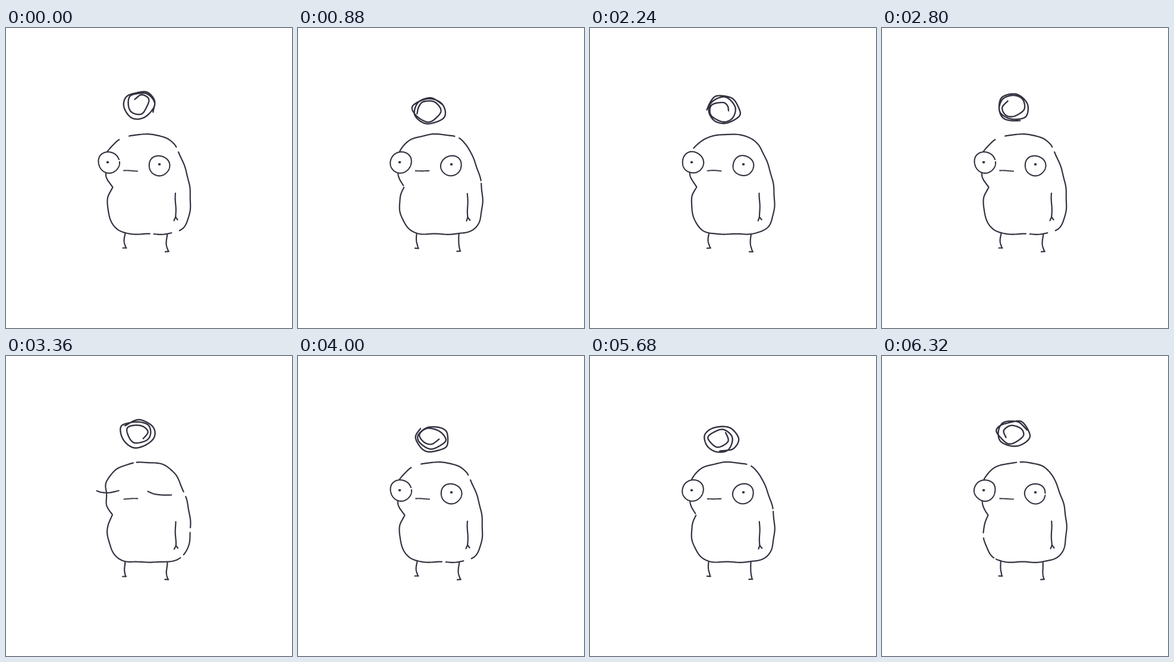
Animation of 481 by 504 pixels, one loop 6400 ms. Source, as an HTML page with a canvas:

```html
<!DOCTYPE html>
<html lang="en">
<head>
<meta charset="utf-8">
<title>Tangled thoughts</title>
<style>
html, body { margin: 0; width: 100%; height: 100%; overflow: hidden; background: #fff; }
canvas { display: block; width: 481px; height: 504px; }
</style>
</head>
<body>
<canvas id="stage" width="481" height="504"></canvas>
<script>
const ctx = document.getElementById('stage').getContext('2d');
const INK = '#343240', PAPER = '#fff';
const STEP = 80, FRAMES = 80, TANGLE_CYCLE = 40, BOB_CYCLE = 20;
const TAU = Math.PI * 2;

// Key points clockwise from the dent in the left side.
const OUTLINE = [
  [179, 267], [169, 250], [169, 230], [169, 211], [185, 191], [204, 182.5], [230, 178.5],
  [263, 182], [281, 194], [292, 212], [305, 247], [310, 280], [309, 308], [303, 329],
  [290, 341], [267, 346], [237, 346], [202, 345], [183, 334], [172, 309], [171.5, 285], [179, 267]
];

// Where the pen lifts in each redrawn pose: [direction from the middle, half width] in degrees.
const POSE_GAPS = [
  [[-118, 5], [-50, 3], [61, 4], [86, 1.5]],
  [[-71, 2], [-3, 1.2], [176, 1]],
  [[-106, 1.3], [-27, 2.5], [24, 2], [53, 2]],
  [[-140, 2]],
  [[-97, 1.3], [122, 1], [151, 2.5]]
];

let pose = 0;

// A gentle distortion that differs per pose, so every line boils a little.
const warp = ([x, y]) => [
  x + 0.5 * Math.sin(y * 0.17 + pose * 2.4),
  y + 0.5 * Math.sin(x * 0.15 + pose * 1.7)
];

function seeded(seed) {
  let s = seed * 7919 + 17;
  return () => {
    s = (s + 0x6D2B79F5) | 0;
    let t = Math.imul(s ^ (s >>> 15), 1 | s);
    t = (t + Math.imul(t ^ (t >>> 7), 61 | t)) ^ t;
    return ((t ^ (t >>> 14)) >>> 0) / 4294967296;
  };
}

// Catmull-Rom samples through the points.
function smooth(pts, steps = 14) {
  const at = i => pts[Math.min(Math.max(i, 0), pts.length - 1)];
  const out = [];
  for (let i = 0; i < pts.length - 1; i++) {
    const [a, b, c, d] = [at(i - 1), at(i), at(i + 1), at(i + 2)];
    for (let k = 0; k < steps; k++) {
      const t = k / steps;
      out.push([0, 1].map(j => b[j] + t / 2 * (c[j] - a[j]
        + t * (2 * a[j] - 5 * b[j] + 4 * c[j] - d[j] + t * (3 * (b[j] - c[j]) + d[j] - a[j])))));
    }
  }
  return [...out, at(pts.length - 1)];
}

function stroke(pts, width = 2.2, hidden = () => false) {
  ctx.lineWidth = width;
  ctx.beginPath();
  let down = false;
  for (const p of smooth(pts)) {
    const show = !hidden(p);
    if (show) ctx[down ? 'lineTo' : 'moveTo'](...warp(p));
    down = show;
  }
  ctx.stroke();
}

function inGap([x, y]) {
  const angle = Math.atan2(y - 262, x - 240) * 360 / TAU;
  return POSE_GAPS[pose].some(([centre, half]) => Math.abs(angle - centre) < half);
}

function disc(x, y, rx, ry, colour) {
  ctx.fillStyle = colour;
  ctx.beginPath();
  ctx.ellipse(x, y, rx, ry, 0, 0, TAU);
  ctx.fill();
}

function eye(x, y, rx, ry, pupilX, pupilY, gapAngle) {
  disc(x, y, rx, ry, PAPER);
  const gap = gapAngle === undefined ? 0 : 0.22;
  const rim = Array.from({ length: 17 }, (_, i) => {
    const a = (gapAngle || 0) + gap / 2 + (TAU - gap) * i / 16;
    return [x + rx * Math.cos(a), y + ry * Math.sin(a)];
  });
  stroke(rim, 2.1);
  disc(pupilX, pupilY, 2.3, 2.1, INK);
}

function face(blink) {
  if (blink) {
    stroke([[153, 226], [162, 229], [175, 230], [190, 226]]);
    stroke([[239, 227], [250, 232], [263, 234], [278, 233]]);
  } else {
    eye(173, 225.7, 17.8, 17.8, 171, 225.5, pose === 0 ? -0.15 : undefined);
    eye(257.7, 231.2, 17.4, 16.8, 258, 229, pose === 4 ? 0.1 : undefined);
  }
  stroke([[198, 240], [209, 239.7], [221, 240]], 1.9);
}

function limbs() {
  const wrist = [285.5, 318];
  stroke([[285, 278], [285.2, 298], wrist]);
  for (const finger of [[283, 324], [289, 322.5]]) stroke([wrist, finger]);
  for (const [x, hip, foot] of [[200, 346, 370], [271, 347, 375.5]]) {
    stroke([[x, hip], [x - 1, foot - 12], [x + 1.5, foot - 1]]);
    stroke([[x - 3.5, foot], [x + 2.5, foot]]);
  }
}

// A seeded tangle: loose outer turn winding into smaller loops, bobbing overhead.
function tangle(frame) {
  const rand = seeded(frame % TANGLE_CYCLE);
  const cx = 222 + 6 * (rand() - 0.5);
  const cy = 134 - 5 * Math.cos(TAU * frame / BOB_CYCLE);
  const turn = rand() < 0.5 ? -1 : 1;
  const count = 17;
  const shift = [12 * (rand() - 0.5), 10 * (rand() - 0.5)];
  let angle = rand() * TAU;
  const pts = [];
  for (let i = 0; i < count; i++) {
    const inner = Math.max(0, i / count - 0.35);
    const reach = 0.82 + 0.24 * rand() - 0.75 * inner;
    pts.push([
      cx + shift[0] * inner + 29 * reach * Math.cos(angle),
      cy + shift[1] * inner + 24 * reach * Math.sin(angle)
    ]);
    angle += turn * (0.7 + 0.6 * rand());
  }
  stroke(pts, 2.4);
}

function draw(frame) {
  pose = frame % POSE_GAPS.length;
  ctx.fillStyle = PAPER;
  ctx.fillRect(0, 0, 481, 504);
  ctx.strokeStyle = INK;
  ctx.lineCap = ctx.lineJoin = 'round';
  stroke(OUTLINE, 2.2, inGap);
  face(frame >= 41 && frame <= 43);
  limbs();
  tangle(frame);
}

let shown = -1;
function tick() {
  const frame = Math.floor(performance.now() / STEP) % FRAMES;
  if (frame !== shown) draw(shown = frame);
  requestAnimationFrame(tick);
}
tick();
</script>
</body>
</html>
```
